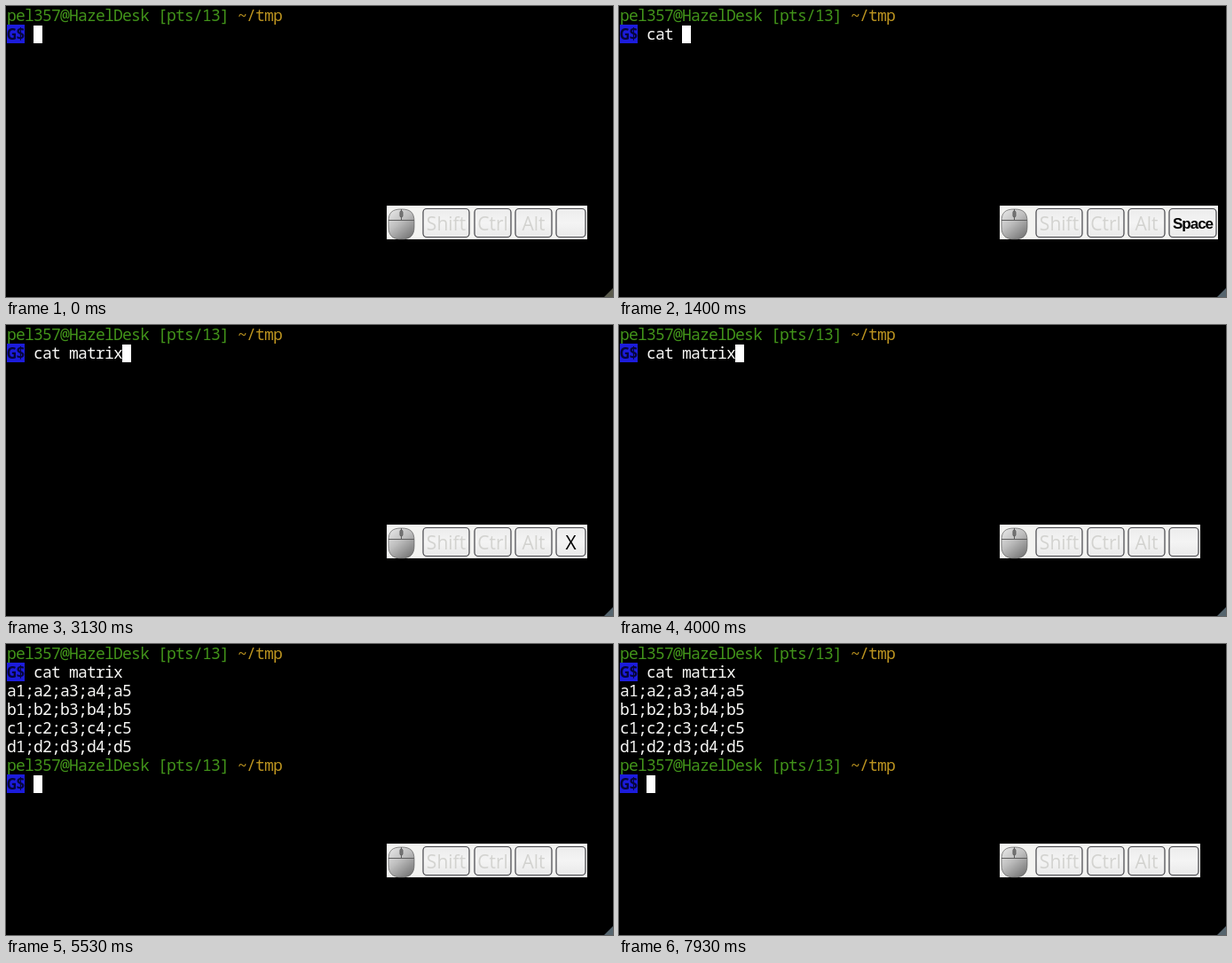
These frames come from a looping animation (684x328 px, 8000 ms). An HTML page:

```html
<!DOCTYPE html>
<html lang="en">
<head>
<meta charset="utf-8">
<title>Terminal session</title>
<style>
  html, body { margin: 0; width: 100%; height: 100%; overflow: hidden; background: #000; }
  svg { display: block; width: 684px; height: 328px; }
  text { white-space: pre; }
  .term { font: 18px "Noto Sans Mono", monospace; letter-spacing: -.8px; fill: #f8f8f6; }
  .user { fill: #42941a; }
  .dir { fill: #bc9420; }
  .mark { font-weight: 700; fill: #06063a; }
  .label { font: 21px "Open Sans", "Noto Sans", sans-serif; text-anchor: middle; fill: #d3d3d0; }
  .label.on { fill: #000; }
  .label.wide { font: 700 17px "Liberation Sans", sans-serif; letter-spacing: -1px; }
  .key { fill: url(#cap); stroke: #45454a; stroke-width: 1.2; }
  #grip { fill: #56656e; animation: grip 8s step-end infinite; }
  @keyframes grip { 0% { fill: #5c5c4e; } .875% { fill: #56656e; } }
</style>
</head>
<body>
<svg viewBox="0 0 684 328">
  <defs>
    <linearGradient id="cap" x2="0" y2="1">
      <stop stop-color="#ececec"/>
      <stop offset=".5" stop-color="#f4f4f4"/>
      <stop offset="1" stop-color="#e9e9e9"/>
    </linearGradient>
    <linearGradient id="shell" x2=".7" y2="1">
      <stop stop-color="#ececec"/>
      <stop offset=".5" stop-color="#bebebe"/>
      <stop offset="1" stop-color="#7c7c7c"/>
    </linearGradient>
    <g id="prompt">
      <text class="term user" x="1" y="17">pel357@HazelDesk [pts/13] <tspan class="dir">~/tmp</tspan></text>
      <rect x="1" y="21" width="20" height="21" fill="#1c1cdc"/>
      <text class="term mark" x="1" y="38">G$</text>
    </g>
  </defs>
  <rect width="684" height="328"/>
  <use href="#prompt"/>
  <text class="term" id="cmd" x="31" y="38"></text>
  <g id="output" visibility="hidden">
    <use href="#prompt" y="126"/>
  </g>
  <rect id="cursor" y="22" width="10" height="20" fill="#fff"/>

  <rect id="panel" x="429" y="225" height="38" fill="#f3f3f1"/>
  <g stroke="#5e5e5e">
    <path d="M431 243C431 233 435 229 445.500 229S460 233 460 243V249C460 259 455 263 445.500 263S431 259 431 249Z" fill="url(#shell)" stroke-width=".7"/>
    <path d="M431 241.500H460M445.500 229V241" fill="none"/>
    <rect x="444" y="231" width="3" height="7" rx="1.500" fill="#777"/>
  </g>
  <g id="mods"></g>
  <rect class="key" id="key" x="620" y="228.500" height="32" rx="4"/>
  <text id="name" y="252.500"></text>
  <path id="grip" d="M684 318V328H674Z"/>
</svg>
<script>
  const LOOP = 8000, ECHO = 65, HOLD = 680;
  const $ = id => document.getElementById(id);
  const set = (el, attrs) => Object.entries(attrs).forEach(([k, v]) => el.setAttribute(k, v));

  function add(parent, tag, attrs, text = '') {
    const el = document.createElementNS('http://www.w3.org/2000/svg', tag);
    set(el, attrs);
    el.textContent = text;
    parent.append(el);
  }

  [['Shift', 470, 52], ['Ctrl', 528, 41], ['Alt', 574, 41]].forEach(([text, x, width]) => {
    add($('mods'), 'rect', { class: 'key', x, y: 228.5, width, height: 32, rx: 4 });
    add($('mods'), 'text', { class: 'label', x: x + width / 2, y: 252.5 }, text);
  });

  [...'abcd'].forEach((row, i) => {
    const cells = [1, 2, 3, 4, 5].map(n => row + n).join(';');
    add($('output'), 'text', { class: 'term', x: 1, y: 59 + 21 * i }, cells);
  });

  const line = 'cat matrix';
  const times = [470, 740, 1000, 1270, 1800, 2070, 2330, 2600, 2870, 3065, 4200];
  const keyName = i => i === line.length ? 'Enter' : line[i] === ' ' ? 'Space' : line[i].toUpperCase();

  function draw(t) {
    const count = times.filter(at => t >= at + ECHO).length;
    const done = count > line.length;
    $('cmd').textContent = line.slice(0, count);
    set($('output'), { visibility: done ? 'visible' : 'hidden' });
    set($('cursor'), { x: 31 + (done ? 0 : 10 * count), y: done ? 148 : 22 });

    const last = times.filter(at => t >= at).length - 1;
    const held = last >= 0 && t < times[last] + HOLD;
    const name = held ? keyName(last) : '';
    const wide = name.length > 1;
    const width = wide ? 53 : 33;
    set($('panel'), { width: wide ? 246 : 226 });
    set($('key'), { width });
    set($('name'), { x: 620 + width / 2, y: wide ? 251 : 252.5, class: wide ? 'label on wide' : 'label on' });
    $('name').textContent = name;
  }

  const start = performance.now();
  function tick() {
    draw((performance.now() - start) % LOOP);
    requestAnimationFrame(tick);
  }
  draw(0);
  tick();
</script>
</body>
</html>
```
